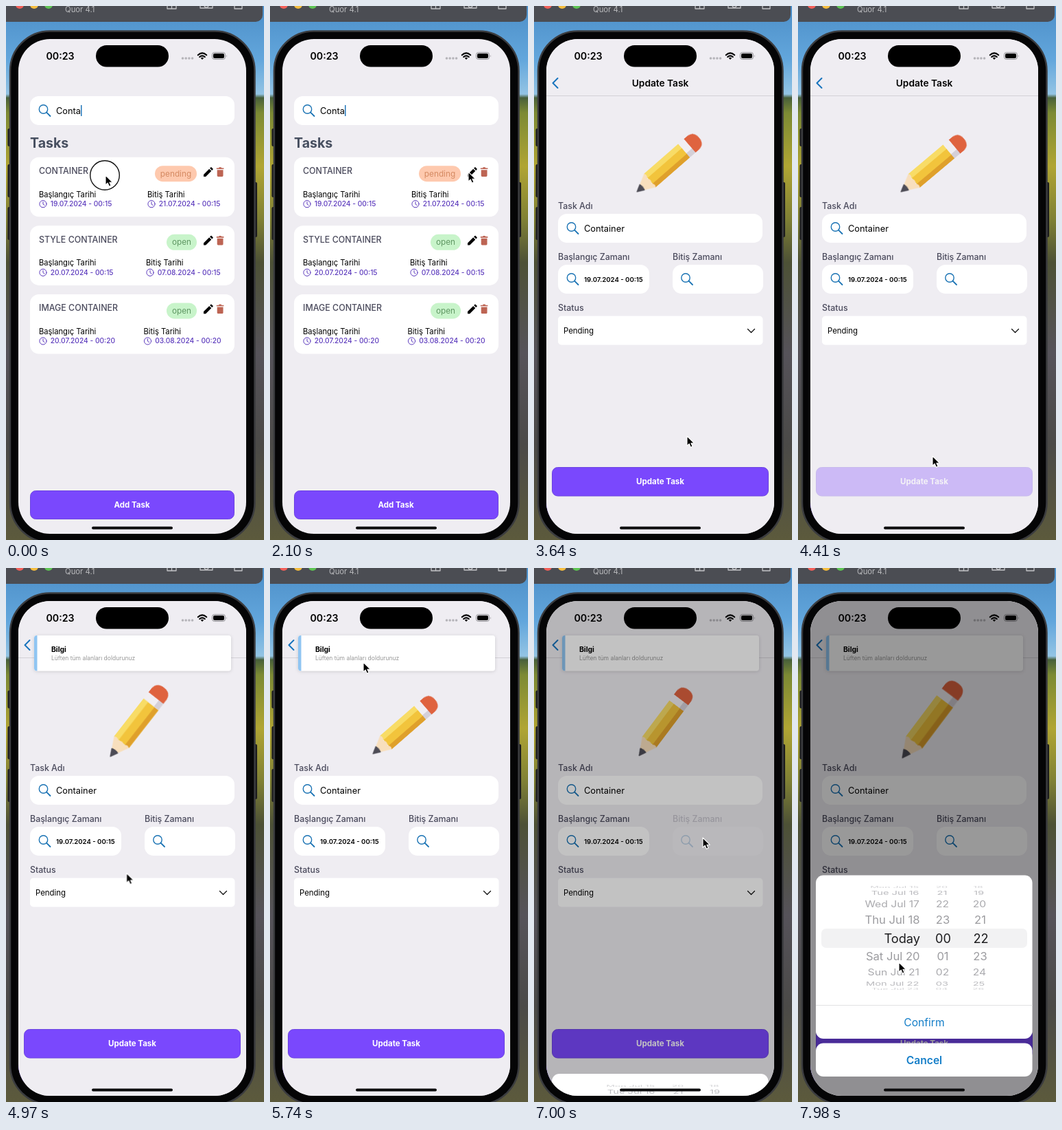
An HTML page that plays this animation: 376x776 px, repeating every 8 s.

```html
<!DOCTYPE html>
<html lang="tr">
<head>
<meta charset="utf-8">
<title>Tasks</title>
<style>
  html, body { margin: 0; width: 100%; height: 100%; overflow: hidden; background: #4a4a38; }
  svg { display: block; width: 376px; height: 776px; }
  text { font-family: Inter, Roboto, sans-serif; white-space: pre; }
  .mid { text-anchor: middle; }
  .end { text-anchor: end; }
  .b { font-weight: 700; }
  .sb { font-weight: 600; }
  .title { font-size: 12.4px; font-weight: 500; fill: #4a4a5c; }
  .cap { font-size: 11.2px; }
  .date { font-size: 10.2px; font-weight: 500; fill: #5c3abd; }
  .pill { font-size: 11.8px; }
  .field { font-size: 12.8px; }
  .btn { font-size: 11.5px; font-weight: 700; fill: #fff; text-anchor: middle; }
  .act { font-size: 15.6px; fill: #147ec8; text-anchor: middle; }
  .line { fill: none; stroke-linecap: round; stroke-linejoin: round; }

  #cursor, #ring, #caret, #form, #list, #pencil, #update, #toast, #due, #shade, #sheet {
    animation: 8s linear infinite;
  }
  #cursor { animation-name: cursor; }
  #ring { animation-name: ring; }
  #caret { animation-name: caret; }
  #form { animation-name: form; }
  #list { animation-name: list; }
  #pencil { animation-name: pencil; }
  #update { animation-name: update; }
  #toast { animation-name: toast; }
  #due { animation-name: due; }
  #shade { animation-name: shade; }
  #sheet { animation-name: sheet; }

  @keyframes cursor {
    0%, .9% { transform: translate(145px, 246px); }
    10.5% { transform: translate(190px, 250px); }
    13.1% { transform: translate(268px, 257px); animation-timing-function: ease-out; }
    17.5%, 19.2% { transform: translate(286px, 267px); animation-timing-function: ease-in-out; }
    22.75%, 23.5% { transform: translate(301px, 249px); animation-timing-function: ease-in-out; }
    26.25%, 33.5% { transform: translate(289px, 241px); animation-timing-function: ease-in-out; }
    41% { transform: translate(232px, 700px); animation-timing-function: ease-in-out; }
    45%, 47% { transform: translate(223px, 625px); animation-timing-function: ease-in-out; }
    52.5%, 58.5% { transform: translate(196px, 654px); animation-timing-function: ease-in-out; }
    67%, 68.7% { transform: translate(142px, 96px); animation-timing-function: ease-in-out; }
    71.5%, 72% { transform: translate(136px, 137px); animation-timing-function: ease-in-out; }
    77.6%, 90% { transform: translate(246px, 392px); animation-timing-function: ease-in-out; }
    99.75%, 100% { transform: translate(147px, 573px); }
  }
  @keyframes ring {
    0%, 1.7% { opacity: 1; }
    1.75%, 100% { opacity: 0; }
  }
  @keyframes caret {
    0%, 2.5% { opacity: 1; }
    4.4%, 7.5% { opacity: 0; }
    9.5%, 15.2% { opacity: 1; }
    17.4%, 20.4% { opacity: 0; }
    22.6%, 100% { opacity: 1; }
  }
  @keyframes form {
    0%, 30.5% { transform: translateX(334px); animation-timing-function: cubic-bezier(.2, .85, .3, 1); }
    37.2%, 100% { transform: none; }
  }
  @keyframes list {
    0%, 30.5% { transform: none; animation-timing-function: cubic-bezier(.2, .85, .3, 1); }
    37.2%, 100% { transform: translateX(-100px); }
  }
  @keyframes pencil {
    0%, 36% { transform: translate(152px, 274px) rotate(-53deg) scale(1.08); animation-timing-function: ease-in-out; }
    45.5% { transform: translate(150px, 270px) rotate(-41deg) scale(1); animation-timing-function: ease-in-out; }
    50% { transform: translate(152px, 274px) rotate(-51deg) scale(1.04); animation-timing-function: ease-in-out; }
    55.125% { transform: translate(150px, 270px) rotate(-40deg) scale(1); animation-timing-function: ease-in-out; }
    62.5% { transform: translate(152px, 274px) rotate(-52deg) scale(1.06); animation-timing-function: ease-in-out; }
    71.75% { transform: translate(150px, 270px) rotate(-41deg) scale(1); animation-timing-function: ease-in-out; }
    79% { transform: translate(152px, 275px) rotate(-52deg) scale(1.08); animation-timing-function: ease-in-out; }
    87.5% { transform: translate(153px, 273px) rotate(-53deg) scale(1); animation-timing-function: ease-in-out; }
    93.5% { transform: translate(150px, 270px) rotate(-43deg) scale(1); animation-timing-function: ease-in-out; }
    99.75%, 100% { transform: translate(152px, 276px) rotate(-53deg) scale(1.13); }
  }
  @keyframes update {
    0%, 53.75% { opacity: 1; animation-timing-function: ease-in-out; }
    55.6%, 56% { opacity: .2; animation-timing-function: ease-in-out; }
    59.1%, 100% { opacity: 1; }
  }
  @keyframes toast {
    0%, 55.125% { transform: translateY(-125px); animation-timing-function: cubic-bezier(.16, 1, .3, 1); }
    60.5%, 100% { transform: none; }
  }
  @keyframes due {
    0%, 82.5% { opacity: 1; animation-timing-function: ease-in-out; }
    84.4%, 88.1% { opacity: .25; animation-timing-function: ease-in-out; }
    91.25%, 100% { opacity: 1; }
  }
  @keyframes shade {
    0%, 85.46% { opacity: 0; animation-timing-function: cubic-bezier(.455, .03, .515, .955); }
    89.21%, 100% { opacity: .4; }
  }
  @keyframes sheet {
    0%, 85.46% { transform: translateY(720px); animation-timing-function: cubic-bezier(.455, .03, .515, .955); }
    89.21%, 100% { transform: none; }
  }
</style>
</head>
<body>
<svg viewBox="0 0 376 776">
  <defs>
    <linearGradient id="scene" x2="0" y2="1">
      <stop offset="0" stop-color="#4d8fc8"/>
      <stop offset=".1" stop-color="#62a6dc"/>
      <stop offset=".165" stop-color="#93c4e4"/>
      <stop offset=".172" stop-color="#48603a"/>
      <stop offset=".2" stop-color="#7c8a34"/>
      <stop offset=".3" stop-color="#b0a534"/>
      <stop offset=".4" stop-color="#7f8035"/>
      <stop offset=".48" stop-color="#4d5136"/>
      <stop offset=".65" stop-color="#56535a"/>
      <stop offset=".82" stop-color="#4b4a48"/>
      <stop offset="1" stop-color="#5c5a3c"/>
    </linearGradient>
    <clipPath id="screen"><rect x="18" y="48" width="332" height="719" rx="46"/></clipPath>
    <filter id="soft" x="-10%" y="-30%" width="120%" height="160%">
      <feDropShadow dx="0" dy="1" stdDeviation="2.5" flood-opacity=".14"/>
    </filter>
    <g id="lens" class="line" stroke="#1a73b4" stroke-width="1.4">
      <circle r="6.2"/><path d="M4.6 4.6 10 10" stroke-width="1.8"/>
    </g>
    <g id="clock" class="line" stroke="#5c3abd">
      <circle r="5.1"/><path d="M0-3V.3L2.2 1.8"/>
    </g>
    <g id="edit">
      <path d="M0 14V10.9L8.2 2.7 11.3 5.8 3.1 14ZM9.1 1.8 10.4.5Q11-.1 11.6.5L13.5 2.4Q14.1 3 13.5 3.6L12.2 4.9Z"/>
    </g>
    <g id="bin" fill="#bd6453">
      <path d="M0 1H3L4-.2H6.6L7.6 1H10.6V2.6H0ZM.9 3.7H9.7V12Q9.7 13.4 8.3 13.4H2.3Q.9 13.4.9 12Z"/>
    </g>
  </defs>

  <rect width="376" height="776" fill="url(#scene)"/>

  <rect x="-12" y="-20" width="386" height="43" rx="10" fill="#4b4d53"/>
  <circle cx="20" cy="-2" r="6" fill="#f2605a"/>
  <circle cx="41" cy="-2" r="6" fill="#f5bd3f"/>
  <circle cx="62" cy="-2" r="6" fill="#5ec454"/>
  <text x="86" y="9" font-size="11.3" fill="#b9babd">Quor 4.1</text>
  <g class="line" stroke="#c3c4c7" stroke-width="1.3">
    <path d="M235-5V4H248V-5M241.500-5V4"/>
    <path d="M283-5V3H301V-5"/><circle cx="292" cy="-1" r="3"/>
    <path d="M333-5V4H344V-5"/>
  </g>

  <g fill="#1d1d1f">
    <rect x="2.500" y="178" width="5" height="26" rx="2"/>
    <rect x="2.500" y="230" width="5" height="48" rx="2"/>
    <rect x="2.500" y="292" width="5" height="48" rx="2"/>
    <rect x="361" y="256" width="5" height="80" rx="2"/>
  </g>
  <rect x="6" y="36.500" width="356.500" height="743" rx="58" fill="#050506" stroke="#3b3c3f" stroke-width="2.500"/>

  <g clip-path="url(#screen)">
    <rect x="18" y="48" width="332" height="720" fill="#efedf2"/>

    <g id="list">
      <rect x="35" y="131" width="298" height="42" rx="13" fill="#fff"/>
      <use href="#lens" x="54.500" y="150"/>
      <text class="field" x="73" y="156.500">Conta</text>
      <rect id="caret" x="109" y="144" width="1.500" height="16" fill="#2276ba"/>
      <text class="b" x="35" y="206" font-size="19.600" fill="#474f60">Tasks</text>
      <g id="cards"></g>
      <rect x="35.500" y="704.500" width="297" height="41" rx="8" fill="#7a48fd" stroke="#6c44df"/>
      <text class="btn" x="183.500" y="729">Add Task</text>
    </g>

    <g id="form">
      <rect x="18" y="48" width="334" height="720" fill="#efedf2"/>
      <path d="M18 130.500H350" stroke="#d3d1d7"/>
      <path class="line" d="M34.500 105 27.500 112 34.500 119" stroke="#1673bd" stroke-width="2"/>
      <text class="sb mid" x="184" y="117" font-size="13.700">Update Task</text>

      <g id="pencil">
        <path d="M25-13 91-13V13H25Z" fill="#f2c43c"/>
        <path d="M25-13H91V-5H23Z" fill="#f8dc66"/>
        <path d="M23 6H91V13H25Z" fill="#dfa02b"/>
        <path d="M0 0 25-13Q28-9 24-4.500 28 0 24 5 28 9 25 13Z" fill="#f8dfbd"/>
        <path d="M0 0 10-5.200Q12 0 10 5.200Z" fill="#4d4c56" stroke="#4d4c56" stroke-linejoin="round"/>
        <path d="M91-13H103V13H91Z" fill="#f1eef2"/>
        <path d="M91 5H103V13H91Z" fill="#d5d0d8"/>
        <path d="M102-13H109Q120-12 120 0 120 12 109 13H102Z" fill="#df633f"/>
      </g>

      <text class="title" x="35" y="294.500">Task Adı</text>
      <rect x="35" y="302" width="298" height="42" rx="13" fill="#fff"/>
      <use href="#lens" x="54.500" y="321"/>
      <text class="field" x="73" y="327.500">Container</text>

      <text class="title" x="35" y="369">Başlangıç Zamanı</text>
      <rect x="35" y="376" width="133" height="42" rx="13" fill="#fff"/>
      <use href="#lens" x="54.500" y="395"/>
      <text class="sb" x="73" y="400.500" font-size="9.600">19.07.2024 - 00:15</text>

      <g id="due">
        <text class="title" x="202" y="369">Bitiş Zamanı</text>
        <rect x="202" y="376" width="132" height="42" rx="13" fill="#fff"/>
        <use href="#lens" x="221" y="395"/>
      </g>

      <text class="title" x="35" y="443">Status</text>
      <rect x="35" y="450.500" width="298.500" height="42" rx="5" fill="#fff"/>
      <text x="43" y="475.500" font-size="11.400">Pending</text>
      <path class="line" d="M311.500 469.500 316.500 474.500 321.500 469.500" stroke="#111" stroke-width="1.300"/>

      <g id="update">
        <rect x="26.500" y="670.500" width="315" height="41.500" rx="8" fill="#7a48fd" stroke="#6c44df"/>
        <text class="btn" x="184" y="695">Update Task</text>
      </g>
    </g>

    <g id="toast">
      <g filter="url(#soft)">
        <rect x="41" y="98" width="287" height="51.500" rx="4" fill="#fff"/>
      </g>
      <path d="M45.500 98H45Q41 98 41 102V145.500Q41 149.500 45 149.500H45.500Z" fill="#8fc5f2"/>
      <text class="b" x="66" y="122" font-size="10.400">Bilgi</text>
      <text x="66" y="134" font-size="8.500" fill="#979797">Lüften tüm alanları doldurunuz</text>
    </g>

    <g>
      <text class="sb" x="58.500" y="78" font-size="14.200">00:23</text>
      <rect x="131" y="57" width="106" height="31.500" rx="15.700"/>
      <g fill="#b5b4b9">
        <circle cx="257.500" cy="76" r="1.800"/><circle cx="262.200" cy="76" r="1.800"/>
        <circle cx="266.900" cy="76" r="1.800"/><circle cx="271.600" cy="76" r="1.800"/>
      </g>
      <g class="line" stroke="#000" stroke-width="2.100" stroke-linecap="butt">
        <path d="M279.800 71.300Q286 65.600 292.200 71.300M282.200 74Q286 70.600 289.800 74"/>
      </g>
      <path d="M286 78 283.700 75.600Q286 73.800 288.300 75.600Z"/>
      <rect x="300.500" y="67.500" width="19" height="10" rx="3.200" fill="none" stroke="#8f8e93"/>
      <rect x="302" y="69" width="16" height="7" rx="2"/>
      <path d="M321 71V74.500Q322.500 72.700 321 71Z" fill="#8f8e93"/>
    </g>

    <rect id="shade" x="18" y="48" width="332" height="720" opacity="0"/>

    <g id="sheet">
      <rect x="26" y="446.500" width="315.500" height="237.500" rx="11" fill="#fff"/>
      <rect x="34" y="524" width="300" height="28" rx="7" fill="#f2f2f3"/>
      <g id="wheel"></g>
      <path d="M26 635.500H341.500" stroke="#e2e2e4"/>
      <text class="act" x="184" y="665.500">Confirm</text>
      <rect x="26" y="690.500" width="315.500" height="48.500" rx="11" fill="#fff"/>
      <text class="act sb" x="184" y="720.500">Cancel</text>
    </g>

    <rect x="125" y="756.500" width="118" height="4" rx="2" fill="#0b0b0c"/>
  </g>

  <circle id="ring" cx="144" cy="246" r="21.300" fill="none" stroke="#111" stroke-width="1.400"/>
  <g id="cursor">
    <path d="M0 0V14.200L3.200 11.200 5.400 16.200 8 15.100 5.900 10.200H10.200Z" stroke="#fff" stroke-width="1.100" stroke-linejoin="round"/>
  </g>
</svg>
<script>
  const byId = id => document.getElementById(id);

  const tasks = [
    ['CONTAINER', 'pending', 206, '19.07.2024 - 00:15', '21.07.2024 - 00:15'],
    ['STYLE CONTAINER', 'open', 204, '20.07.2024 - 00:15', '07.08.2024 - 00:15'],
    ['IMAGE CONTAINER', 'open', 200.5, '20.07.2024 - 00:20', '03.08.2024 - 00:20'],
  ];
  const tints = { pending: ['#fec9ae', '#d58a62', 217], open: ['#c8f4ca', '#5f9763', 234] };

  const span = (x, label, date) => `
    <text class="cap" x="${x}" y="58">${label}</text>
    <use href="#clock" x="${x + 6}" y="68"/>
    <text class="date" x="${x + 16.7}" y="71.6">${date}</text>`;

  byId('cards').innerHTML = tasks.map(([name, status, x, start, end], i) => {
    const [bg, ink, left] = tints[status];
    return `<g transform="translate(0 ${219.7 + i * 99.6})">
      <rect x="35" width="298" height="86.600" rx="13" fill="#fff"/>
      <text class="title" x="48" y="24.600">${name}</text>
      <rect x="${left}" y="12.500" width="${278 - left}" height="23" rx="11.500" fill="${bg}"/>
      <text class="pill mid" x="${(left + 278) / 2}" y="28" fill="${ink}">${status}</text>
      <use href="#edit" x="288" y="14.300"/>
      <use href="#bin" x="306.800" y="14.800"/>
      ${span(48, 'Başlangıç Tarihi', start)}
      ${span(x, 'Bitiş Tarihi', end)}
    </g>`;
  }).join('');

  // Rows of the date wheel: offset from the centre, size, squash, shade
  const looks = [[0, 18.2, 1, '#1c1c1e'], [26.7, 16.6, .94, '#9b9b9f'], [49.5, 15.7, .8, '#a9a9ad'],
                 [66, 14.7, .55, '#b9b9bd'], [74, 14, .22, '#d2d2d5']];
  const days = ['Mon Jul 15', 'Tue Jul 16', 'Wed Jul 17', 'Thu Jul 18', 'Today',
                'Sat Jul 20', 'Sun Jul 21', 'Mon Jul 22', 'Tue Jul 23'];
  const two = n => String(n).padStart(2, '0');

  byId('wheel').innerHTML = days.map((day, i) => {
    const k = i - 4;
    const [dy, size, squash, ink] = looks[Math.abs(k)];
    const shift = Math.abs(k) / 2;
    return `<g transform="translate(0 ${538 + Math.sign(k) * dy}) scale(1 ${squash})" font-size="${size}" fill="${ink}">
      <text class="end" x="${178 - shift}" y="${size * .36}">${day}</text>
      <text class="mid" x="${211.5 - shift}" y="${size * .36}">${two((24 + k) % 24)}</text>
      <text class="mid" x="${266.5 - shift * 2}" y="${size * .36}">${two(22 + k)}</text>
    </g>`;
  }).join('');
</script>
</body>
</html>
```
